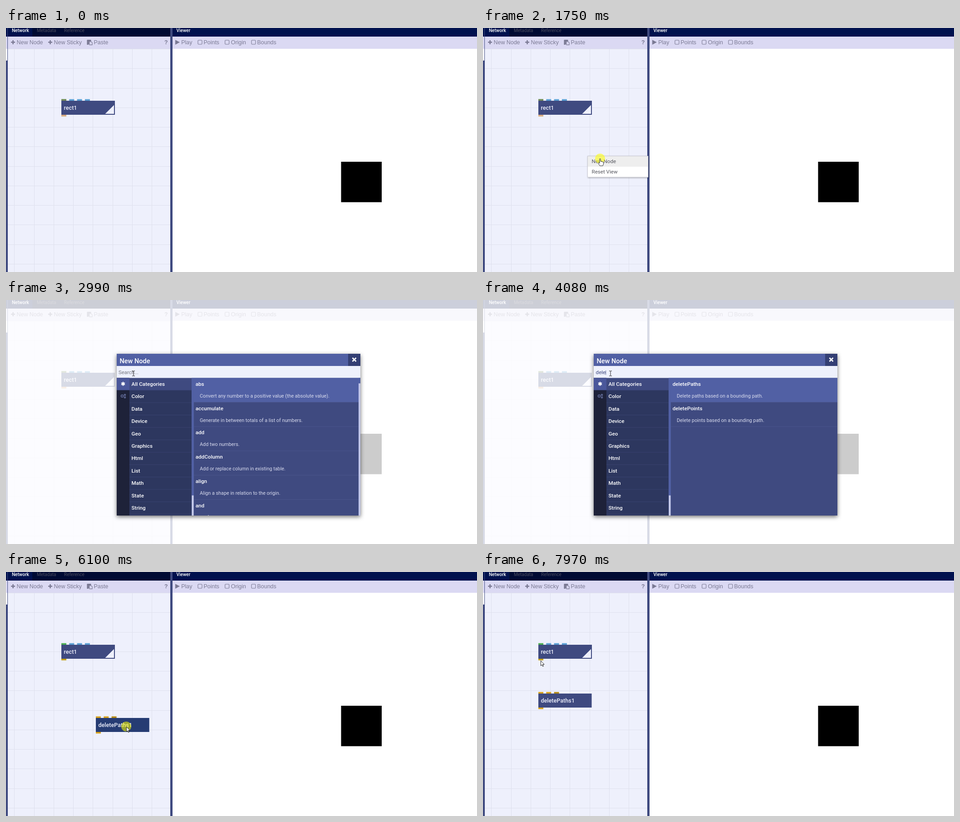
An HTML page that plays this animation: 1038 by 540 pixels, repeating every 8000 ms.

```html
<!DOCTYPE html>
<html lang="en">
<head>
<meta charset="utf-8">
<title>Adding a node</title>
<style>
  html, body { margin: 0; height: 100%; overflow: hidden; background: #fff; }
  svg { display: block; width: 100vw; height: 100vh; }
  text { font-family: Roboto, "Noto Sans", sans-serif; white-space: pre; }
  .tab { font-size: 10px; font-weight: 500; fill: #fff; }
  .dim { fill: #4b4d60; font-weight: 400; }
  .tool { font: 12.4px "Liberation Sans", Arial, sans-serif; fill: #7b7a94; }
  .label { font-size: 12.6px; font-weight: 500; fill: #eef0fc; }
  .menu { font-size: 11.6px; fill: #55565e; }
  .title { font-size: 14.5px; font-weight: 500; fill: #fff; }
  .item { font-size: 11.7px; font-weight: 500; fill: #fff; }
  .about { font-size: 10.8px; fill: #d9dcee; }
  .hint { font-size: 11.4px; fill: #74767f; }
  .typed { font-size: 11.6px; fill: #3f4a80; }
  .icon { fill: none; stroke: #7b7a94; }
  #frame { filter: drop-shadow(0 3px 5px rgba(0, 0, 0, .55)); }
  #menu > .card { filter: drop-shadow(1px 1px 1.5px rgba(0, 0, 0, .4)); }
</style>
</head>
<body>
<svg viewBox="0 0 1038 540">
  <defs>
    <clipPath id="inside"><rect x="244" y="119" width="537" height="358"/></clipPath>
  </defs>

  <!-- panes -->
  <rect width="1038" height="540" fill="#fff"/>
  <rect x="4" y="46" width="358" height="494" fill="#eef0fc"/>
  <path id="grid" fill="none" stroke="#dfe1ee"/>
  <rect width="1038" height="19" fill="#00114e"/>
  <rect x="58" width="304" height="19" fill="#000a33"/>
  <rect y="19" width="1038" height="27" fill="#dbd9f3"/>
  <path d="M0 72H3V0H4V540H0ZM362 0H367V540H362Z" fill="#3f4a80"/>
  <text class="tab" x="13" y="8.8">Network</text>
  <text class="tab dim" x="68" y="8.8">Metadata</text>
  <text class="tab dim" x="128" y="8.8">Reference</text>
  <text class="tab" x="375.5" y="8.8">Viewer</text>

  <!-- toolbar -->
  <path class="icon" stroke-width="2.6" d="M11 31.5H20M15.5 27V36M93 31.5H102M97.5 27V36"/>
  <path class="icon" stroke-width="1.2" d="M182 36.4H179V27H187V29M184 30H187.5L190 32.5V37.4H184Z"/>
  <path d="M179 26H187V30H183V36H179Z" fill="#7b7a94"/>
  <path d="M373 26.3L383 31.6L373 37Z" fill="#7b7a94"/>
  <g class="icon" stroke-width="1.1">
    <rect x="423" y="27" width="9" height="9" rx="1.5"/>
    <rect x="482.7" y="27" width="9" height="9" rx="1.5"/>
    <rect x="541" y="27" width="9" height="9" rx="1.5"/>
  </g>
  <g class="tool">
    <text class="tool" x="23.6" y="36">New Node</text>
    <text class="tool" x="105.6" y="36">New Sticky</text>
    <text class="tool" x="193.6" y="36">Paste</text>
    <text class="tool" x="349" y="36" style="font-weight:bold">?</text>
    <text class="tool" x="386.3" y="36">Play</text>
    <text class="tool" x="435.6" y="36">Points</text>
    <text class="tool" x="495.8" y="36">Origin</text>
    <text class="tool" x="553.6" y="36">Bounds</text>
  </g>

  <rect x="738.5" y="296" width="89.5" height="89.5"/>

  <!-- nodes -->
  <g id="rect1" transform="translate(122 161)">
    <rect width="118" height="31" fill="#3f4a80"/>
    <path d="M96.5 29L116 9.500V29Z" fill="#eef0fc"/>
    <text class="label" x="5.500" y="20.300">rect1</text>
    <g class="ports" data-colors="#4bae52 #5a9fd4 #5a9fd4 #5a9fd4" data-out="#c6a112"/>
    <g id="muted">
      <rect y="-3.500" width="11" height="3.500" fill="#74885a"/>
      <rect y="31" width="11" height="3.500" fill="#d9ab85"/>
    </g>
  </g>
  <g id="added"><g id="drag">
    <rect width="117.500" height="31" fill="#3f4a80"/>
    <rect id="hover" width="117.500" height="31" fill="#263c73"/>
    <text class="label" x="5.500" y="20.300">deletePaths1</text>
    <g class="ports" data-colors="#d8a21c #d8a21c #b48a16" data-out="#d8a21c"/>
  </g></g>

  <!-- context menu -->
  <g id="menu">
    <rect class="card" x="230" y="283" width="134" height="47.500" fill="#fff"/>
    <rect id="pick" x="230" y="283.500" width="134" height="23.500" fill="#eee"/>
    <rect x="230.500" y="283.500" width="133.500" height="46.500" fill="none" stroke="#c4c4cc" stroke-width=".8"/>
    <text class="menu" x="239.500" y="298.700">New Node</text>
    <text class="menu" x="239.500" y="321.800">Reset View</text>
  </g>

  <!-- dialog -->
  <g id="dialog">
    <rect width="1038" height="540" fill="#fff" opacity=".8"/>
    <rect id="frame" x="244" y="119" width="537" height="358" fill="#3f4a80"/>
    <rect x="244" y="119" width="537" height="27" fill="#5160a4"/>
    <rect x="754" y="119" width="27" height="27" fill="#343f74"/>
    <path d="M763.500 128L771.500 136M771.500 128L763.500 136" stroke="#fff" stroke-width="2.800"/>
    <text class="title" x="250.500" y="140">New Node</text>
    <rect x="244" y="146" width="537" height="26.500" fill="#eef1fc"/>
    <g clip-path="url(#inside)">
      <rect x="244" y="172.500" width="28" height="305" fill="#1e2239"/>
      <rect x="244" y="172.500" width="28" height="27" fill="#4a579a"/>
      <path d="M258 181V190M254.100 183.250L261.900 187.750M261.900 183.250L254.100 187.750" stroke="#fff" stroke-width="2.100"/>
      <g fill="none" stroke="#66709f" stroke-width="1.500">
        <circle cx="256" cy="212.500" r="2.500"/>
        <circle cx="262" cy="210" r="1.500"/>
        <circle cx="262" cy="215.500" r="1.500"/>
      </g>
      <rect x="272" y="199.700" width="137" height="278" fill="#2d375f"/>
      <g id="categories"></g>
      <rect x="409" y="172.500" width="5" height="305" fill="#5160a4"/>
      <rect x="409.500" y="432.500" width="4" height="45" fill="#c9cdeb"/>
      <rect x="414" y="172.500" width="367" height="53.500" fill="#5160a4"/>
      <g id="results"></g>
      <g id="scroll">
        <rect x="777" y="172.500" width="4" height="305" fill="#5160a4"/>
        <rect x="777" y="184.500" width="4" height="293" fill="#c0c5e8"/>
      </g>
    </g>
    <text id="hint" class="hint" x="248" y="163.700">Search...</text>
    <g id="query"></g>
  </g>

  <!-- pointer -->
  <g id="pointer">
    <circle id="click" r="11" fill="#ff0" opacity=".55"/>
    <path id="arrow" d="M.4.500V11.500L2.900 9.200L4.700 13L6.300 12.300L4.600 8.500H8Z" fill="#fff" stroke="#111" stroke-width=".9"/>
    <path id="hand" d="M-1 .8Q0-.8 1 .8V6L5 6.800Q7.500 7.300 7.500 9.500V12L6 16H-.5L-4 10.500Q-4.500 8.500-2.500 9L-1 10.500Z" fill="#fff" stroke="#333" stroke-width="1"/>
    <path id="beam" d="M-2-5H0.500L1-4.500L1.500-5H4M1-4.500V5.500M-2 6H.5L1 5.500L1.500 6H4" fill="none" stroke="#222"/>
  </g>
</svg>

<script>
const LOOP = 8000;
const $ = id => document.getElementById(id);
const css = [];

function add(parent, tag, attrs, text = "") {
  const el = document.createElementNS("http://www.w3.org/2000/svg", tag);
  for (const key in attrs) el.setAttribute(key, attrs[key]);
  el.textContent = text;
  return parent.appendChild(el);
}

// frames: [ms, declarations] pairs, each held until the next
function animate(id, frames) {
  const body = frames.map(([ms, rule]) => `${ms / LOOP * 100}% { ${rule} }`).join("\n");
  css.push(`@keyframes ${id}-play { ${body} }
    #${id} { animation: ${id}-play ${LOOP}ms step-end infinite; }`);
}

function show(id, opacity, ...spans) {
  const frames = spans[0][0] > 0 ? [[0, "opacity: 0"]] : [];
  for (const [from, to] of spans) frames.push([from, `opacity: ${opacity}`], [to, "opacity: 0"]);
  if (frames.at(-1)[0] < LOOP) frames.push([LOOP, "opacity: 0"]);
  animate(id, frames);
}

// stops: [ms, x, y, jumps on the way to the next stop]
function move(id, stops) {
  animate(id, stops.map(([ms, x, y, jumps]) => [ms,
    `transform: translate(${x}px, ${y}px);` +
    (jumps ? `animation-timing-function: steps(${jumps}, jump-start)` : "")]));
}

// canvas grid
let lines = "";
for (let x = 18.8; x < 362; x += 43.28) lines += `M${Math.floor(x) + .5} 46V540`;
for (let y = 46.6; y < 540; y += 43.25) lines += `M4 ${Math.floor(y) + .5}H362`;
$("grid").setAttribute("d", lines);

for (const group of document.querySelectorAll(".ports")) {
  const port = (x, y, fill) => add(group, "rect", { x, y, width: 11, height: 3.5, fill });
  group.dataset.colors.split(" ").forEach((fill, i) => port(i * 17.3, -3.5, fill));
  port(0, 31, group.dataset.out);
}

// dialog contents
["All Categories", "Color", "Data", "Device", "Geo", "Graphics", "Html", "List", "Math", "State", "String"]
  .forEach((name, i) => {
    const y = 172.5 + i * 27.43;
    add($("categories"), "rect", { x: 272, y: y + 26.8, width: 137, height: 1, fill: "#38426f" });
    add($("categories"), "text", { class: "item", x: 276.5, y: y + 17.3 }, name);
  });

const about = {
  abs: "Convert any number to a positive value (the absolute value).",
  accumulate: "Generate in between totals of a list of numbers.",
  add: "Add two numbers.",
  addColumn: "Add or replace column in existing table.",
  align: "Align a shape in relation to the origin.",
  and: "Perform the logical and operation.",
  deletePaths: "Delete paths based on a bounding path.",
  deletePoints: "Delete points based on a bounding path."
};

function results(id, names, from, to) {
  const list = add($("results"), "g", { id });
  names.forEach((name, i) => {
    const y = 172.5 + i * 53.8;
    add(list, "rect", { x: 414, y: y + 53.3, width: 367, height: 1, fill: "#4a558c" });
    add(list, "text", { class: "item", x: 417.7, y: y + 17.3 }, name);
    add(list, "text", { class: "about", x: 427, y: y + 43.2 }, about[name]);
  });
  show(id, 1, [from, to]);
}

const names = Object.keys(about);
results("all", names.slice(0, 6), 1820, 3700);
results("some", names.filter(name => name.includes("d")), 3700, 3780);
results("few", names.filter(name => name.startsWith("de")), 3780, 4460);
show("scroll", 1, [1820, 3700]);

// typing
const keys = [3150, 3700, 3780, 3930, 4080, 4460];
for (let n = 0; n < 5; n++) {
  const id = "typed" + n;
  const line = add($("query"), "text", { id, class: "typed", x: 248.6, y: 163.7 }, "dele".slice(0, n));
  add(line, "tspan", { dx: -1 }, "|");
  show(id, 1, [keys[n], keys[n + 1]]);
}
show("hint", 1, [1820, 3700]);

// scene changes
show("menu", 1, [1140, 1820]);
show("pick", 1, [1440, 1820]);
show("dialog", 1, [1820, 4460]);
show("muted", 1, [0, 4460]);
show("added", 1, [4460, LOOP]);
show("hover", 1, [5641, 7266]);

// pointer and drag
show("arrow", 1, [120, 1440], [1820, 2913], [4460, LOOP]);
show("hand", 1, [1440, 1820]);
show("beam", 1, [2913, 4460]);
show("click", .55, [1050, 1140], [1750, 1990], [3150, 3380], [5950, 6880]);
move("pointer", [
  [0, 591, 452],
  [200, 501, 415],
  [430, 501, 415, 3],
  [664, 320, 325, 3],
  [898, 230, 283],
  [1440, 230, 283, 3],
  [1680, 258, 289],
  [2300, 258, 289, 5],
  [2683, 290, 200, 5],
  [3067, 280, 162],
  [5010, 280, 162, 5],
  [5404, 285, 290, 5],
  [5799, 281, 355],
  [6100, 265, 342],
  [6178, 265, 342, 10],
  [6958, 197, 290],
  [7110, 197, 290, 11],
  [7970, 127, 196],
  [LOOP, 127, 196]
]);
move("drag", [
  [0, 206, 334],
  [6100, 198, 323],
  [6178, 198, 323, 10],
  [6958, 122, 269],
  [LOOP, 122, 269]
]);

document.head.appendChild(document.createElement("style")).textContent = css.join("\n");
</script>
</body>
</html>
```
